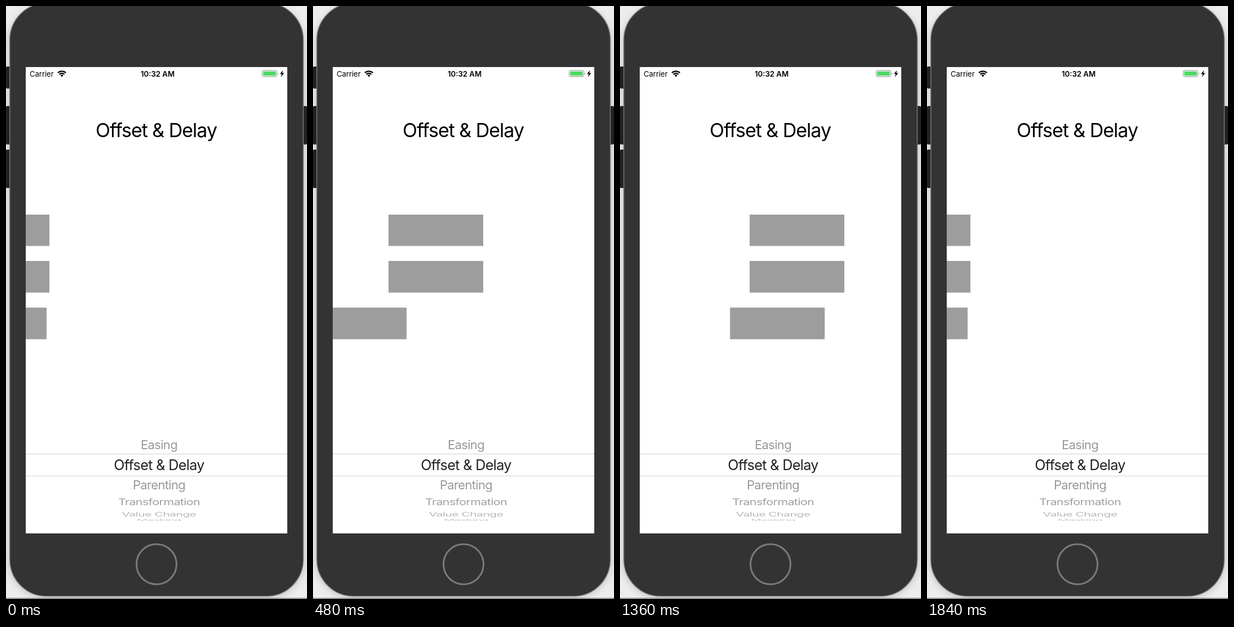
An HTML page that plays this animation: 534 px wide and 1049 px high, repeating every 1.92 s.

```html
<!DOCTYPE html>
<html lang="en">
<head>
<meta charset="utf-8">
<title>Offset & Delay</title>
<style>
  html, body { margin: 0; height: 100%; overflow: hidden; background: #ededed; }
  svg { display: block; }
  text { font-family: Inter, Roboto, sans-serif; }
  .tight { letter-spacing: -.03em; text-anchor: middle; }
  .picker { fill: #999; font-size: 22px; }
</style>
</head>
<body>
<svg width="100%" height="100%" viewBox="0 0 534 1049">
  <defs>
    <filter id="soft" x="-10%" y="-10%" width="120%" height="120%"><feGaussianBlur stdDeviation="7"/></filter>
    <clipPath id="screen"><path d="M35 108h464v825H35z"/></clipPath>
    <clipPath id="wheelEnd"><path d="M35 831h464v80H35z"/></clipPath>
  </defs>

  <rect width="534" height="1049" fill="#ededed"/>
  <rect x="5" y="0" width="524" height="1046" rx="66" fill="#999" opacity=".55" filter="url(#soft)"/>
  <path d="M0 1047.7h534" stroke="#777" stroke-width="1.4"/>
  <g fill="#222">
    <rect x="0" y="107" width="12" height="39" rx="2"/>
    <rect x="0" y="177" width="12" height="68" rx="2"/>
    <rect x="0" y="254" width="12" height="68" rx="2"/>
    <rect x="522" y="177" width="12" height="68" rx="2"/>
  </g>
  <rect x="6.8" y="-5" width="520.6" height="1049" rx="65" fill="#333" stroke="#777" stroke-width="1.5"/>
  <circle cx="267" cy="987.5" r="35.5" fill="none" stroke="#7a7a7a" stroke-width="3"/>
  <path d="M35 108h464v825H35z" fill="#fff"/>

  <text x="42" y="124.5" font-size="13">Carrier</text>
  <g fill="none" stroke="#000" stroke-width="2.2">
    <path d="M92 118.2a10.2 10.2 0 0 1 14.2 0M94.6 121a6.4 6.4 0 0 1 9 0"/>
    <path d="M99.1 125.4l-2.5-2.6a3.6 3.6 0 0 1 5 0z" fill="#000" stroke="none"/>
  </g>
  <text x="269" y="124.5" font-size="13.2" font-weight="600" text-anchor="middle">10:32 AM</text>
  <rect x="454.5" y="114" width="26" height="11" rx="2.5" fill="#fff" stroke="#888"/>
  <rect x="456.3" y="115.7" width="22.4" height="7.6" rx="1" fill="#4cd964"/>
  <path d="M482 117.5q1.6 2 0 4z" fill="#888"/>
  <path d="M491.5 113.5l-5.5 6.8h3.2l-1.6 5.4 5.9-7.2h-3.4z"/>

  <text class="tight" x="266.5" y="232" font-size="34">Offset &amp; Delay</text>

  <g id="blocks" fill="#9d9d9d" clip-path="url(#screen)">
    <rect y="369" width="168" height="55.5"/>
    <rect y="451" width="168" height="56"/>
    <rect y="533.5" width="168" height="56"/>
  </g>

  <path d="M35 792.5h464M35 831.5h464" stroke="#d2d2d2"/>
  <g class="tight picker">
    <text x="271.5" y="784">Easing</text>
    <text x="271.5" y="821" font-size="25.2" fill="#222">Offset &amp; Delay</text>
    <text x="271.5" y="855">Parenting</text>
    <text transform="translate(271.5 883) scale(1 .75)" font-size="21.5" fill="#a0a0a0">Transformation</text>
    <text transform="translate(271.5 902.5) scale(1 .5)" font-size="21.3" fill="#b8b8b8">Value Change</text>
    <g clip-path="url(#wheelEnd)">
      <text transform="translate(271.5 911) scale(1 .25)" font-size="21" fill="#c8c8c8">Masking</text>
    </g>
  </g>
</svg>

<script>
const LOOP = 1920, STEP = 80, RESTART = 1800, CYCLE = 1840;

// Each move is a list of [ms, x]; a track enters, rests, then leaves.
const lead = {
  enter: [[-60, -133], [0, -91], [320, 89], [480, 134], [720, 175], [930, 183], [1100, 183]],
  leave: [[1100, 183], [1320, 218], [1520, 311], [1780, 510]]
};
const follower = {
  enter: [[-60, -100], [0, -96], [320, -40], [480, -2], [720, 92], [850, 148], [960, 183], [1100, 183]],
  leave: [[1100, 183], [1320, 191], [1520, 235], [1680, 323], [1780, 405]]
};

const slope = (a, b) => a && b ? (b[1] - a[1]) / (b[0] - a[0]) : 0;

// Tangent that never overshoots: harmonic mean of the neighbouring slopes.
function tangent(keys, i) {
  if (i === 0) return slope(keys[0], keys[1]) * .5;
  const before = slope(keys[i - 1], keys[i]);
  if (i === keys.length - 1) return before;
  const after = slope(keys[i], keys[i + 1]);
  return before * after > 0 ? 2 * before * after / (before + after) : 0;
}

function along(keys, t) {
  let i = 0;
  while (i < keys.length - 2 && t > keys[i + 1][0]) i++;
  const [t0, x0] = keys[i], [t1, x1] = keys[i + 1];
  const span = t1 - t0, u = Math.min(1, (t - t0) / span), v = 1 - u;
  return x0 * v * v * (1 + 2 * u) + x1 * u * u * (3 - 2 * u)
    + span * u * v * (tangent(keys, i) * v - tangent(keys, i + 1) * u);
}

const position = (track, t) => along(t < 1100 ? track.enter : track.leave, t);
const blocks = [...document.querySelectorAll('#blocks rect')];
const tracks = [lead, lead, follower];

function draw(now) {
  let t = Math.floor((now % LOOP) / STEP) * STEP;
  if (t >= RESTART) t -= CYCLE;
  blocks.forEach((block, i) => block.setAttribute('x', position(tracks[i], t).toFixed(1)));
}

const start = performance.now();
function tick() {
  draw(performance.now() - start);
  requestAnimationFrame(tick);
}
tick();
</script>
</body>
</html>
```
